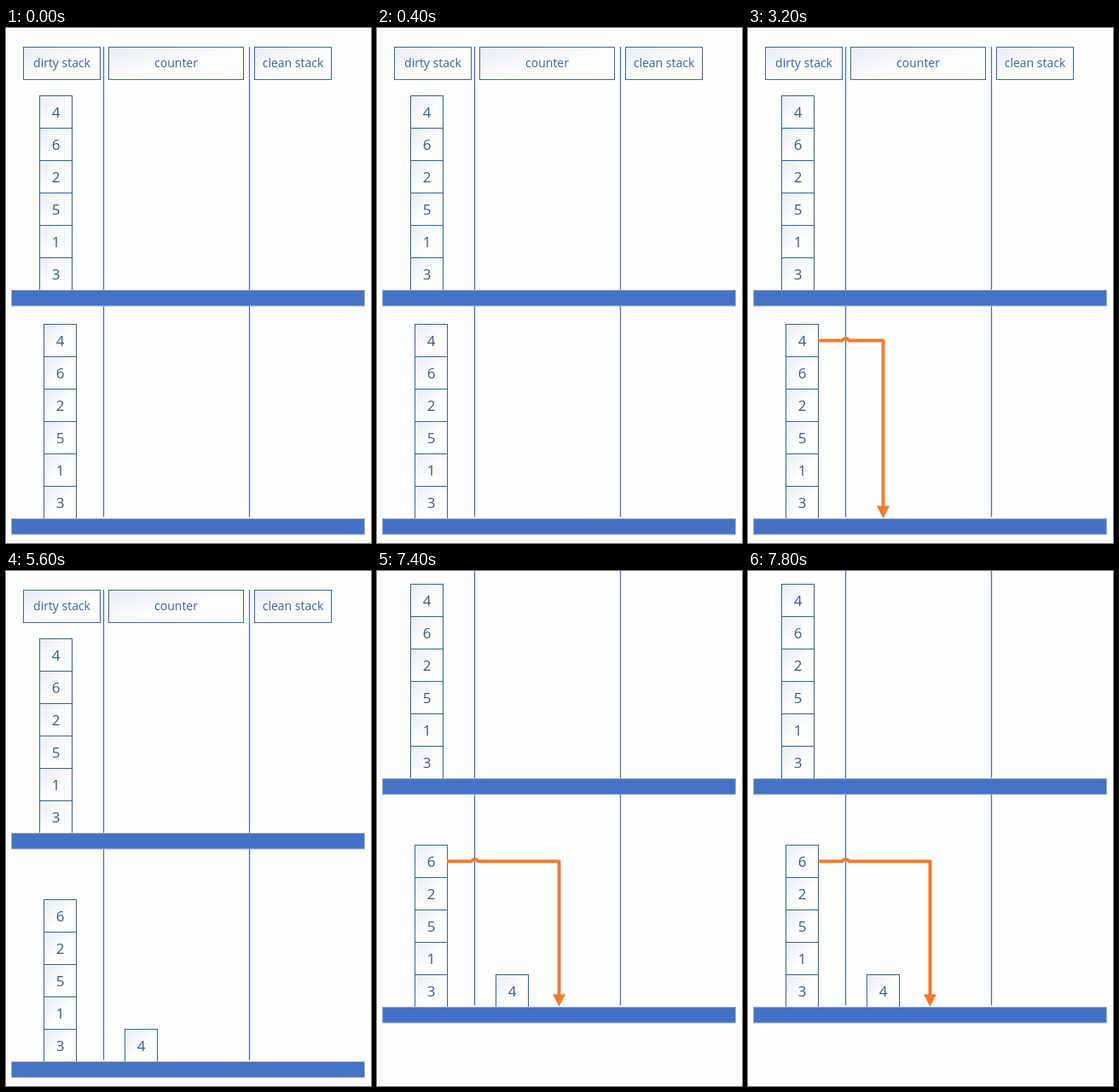
An HTML page for the animation above (8000 ms loop, 428 px wide and 604 px high).

```html
<!DOCTYPE html>
<html>
<head>
<meta charset="utf-8">
<style>
html, body { margin: 0; width: 100%; height: 100%; overflow: hidden; background: #fefefe; }
svg { display: block; width: 428px; height: 604px; }
text { font-family: "Open Sans", "Noto Sans", sans-serif; text-anchor: middle; }
.head rect { stroke: #3c66a8; }
.head text { font-size: 14px; fill: #3c61ad; }
.cell rect { stroke: #36648f; }
.cell text { font-size: 17px; fill: #3a5a85; }
.head rect, .cell rect { fill: url(#shade); }
.divider { stroke: #4472c4; stroke-width: 1.3; }
.bar { fill: #4472c4; stroke: #a9b4c8; }
.arrow path { fill: none; stroke: #ed7d31; stroke-width: 4; stroke-linejoin: round; }
.arrow polygon { fill: #ed7d31; }
</style>
</head>
<body>
<svg viewBox="0 0 428 604">
  <defs>
    <linearGradient id="shade" x1="0" y1="0" x2="1" y2="1">
      <stop offset="0" stop-color="#e9ecf6"/>
      <stop offset=".55" stop-color="#fdfdfe"/>
      <stop offset="1" stop-color="#fefefe"/>
    </linearGradient>
  </defs>
  <g id="page"></g>
</svg>
<script>
const page = document.getElementById('page');
const SIZE = 38, FLOOR = 575.5;

const box = (cls, x, y, w, h, label, base) =>
  `<g class="${cls}"><rect x="${x}" y="${y}" width="${w}" height="${h}"/>` +
  `<text x="${x + w / 2}" y="${y + base}">${label}</text></g>`;
const head = (x, w, label) => box('head', x, 22.5, w, 38, label, 23.5);
const cell = (x, y, n) => box('cell', x, y, SIZE, SIZE, n, 25);
const stack = (x, bottom, items) =>
  items.map((n, i) => cell(x, bottom - SIZE * (items.length - i), n)).join('');
const divider = x => `<path class="divider" d="M${x} 22V573.5"/>`;
const bar = y => `<rect class="bar" x="6.5" y="${y}" width="414" height="18.5"/>`;

// Connector leaving the dirty stack, hopping over the divider, down to the counter
const arrow = (x, y) =>
  `<g class="arrow"><path d="M82 ${y}H110.5Q114.5 ${y - 5} 118.5 ${y}H${x}V562"/>` +
  `<polygon points="${x - 7.5},560.5 ${x + 7.5},560.5 ${x},575"/></g>`;

const dishes = [4, 6, 2, 5, 1, 3];

function scene(step) {
  const moved = step >= 2;
  return head(20.5, 90, 'dirty stack') + head(120.5, 158, 'counter') +
    head(291.5, 90, 'clean stack') +
    divider(114.5) + divider(285.5) +
    stack(39.5, 307.5, dishes) +
    stack(44.5, FLOOR, moved ? dishes.slice(1) : dishes) +
    (moved ? cell(139.5, FLOOR - SIZE, 4) : '') +
    bar(307.5) + bar(575.5) +
    (step === 1 ? arrow(158.5, 366.5) : step === 3 ? arrow(213.5, 404.5) : '');
}

const starts = [0, 3200, 5600, 7400];
let shown = -1;

function draw(now) {
  const t = now % 8000;
  const step = starts.filter(s => t >= s).length - 1;
  if (step !== shown) {
    shown = step;
    page.innerHTML = scene(step);
    page.setAttribute('transform', `translate(0 ${step === 3 ? -64 : 0})`);
  }
}

const begin = performance.now();
function tick() {
  draw(performance.now() - begin);
  requestAnimationFrame(tick);
}
tick();
</script>
</body>
</html>
```
